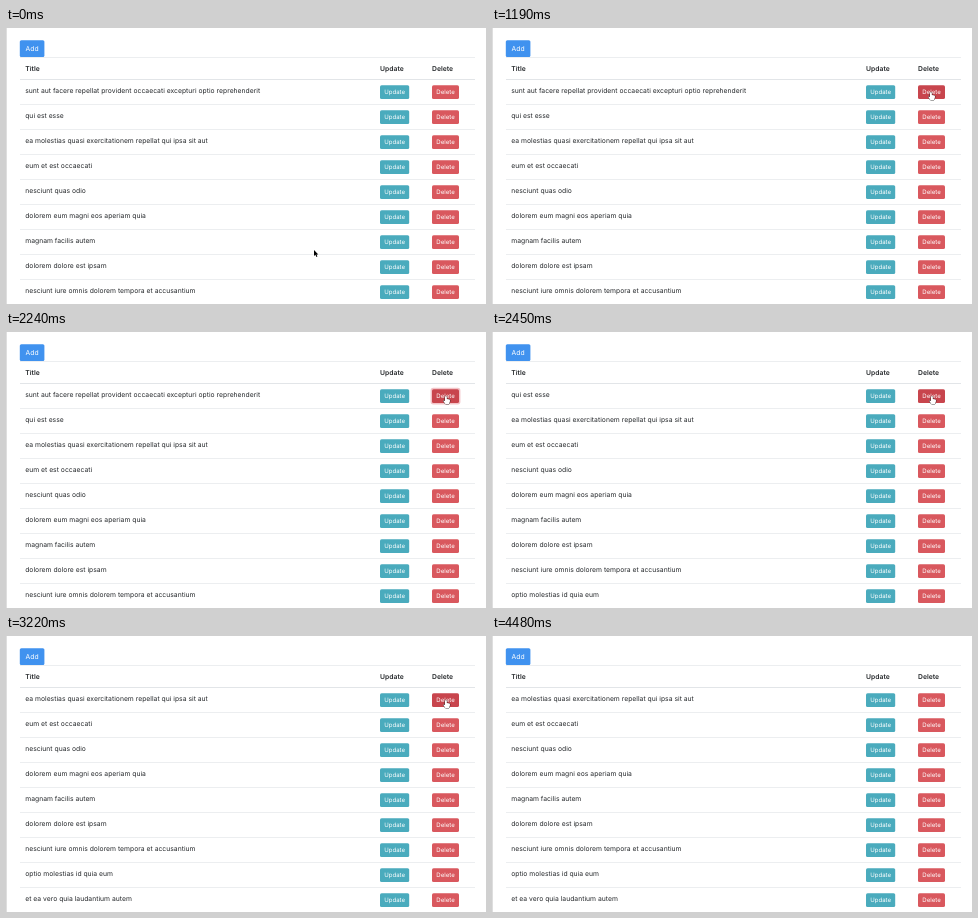
An HTML page with a canvas that plays this animation: 480 by 276 pixels, repeating every 4620 ms.

```html
<!DOCTYPE html>
<html lang="en">
<head>
<meta charset="utf-8">
<title>Table with delete buttons</title>
<style>
  html, body { margin: 0; width: 100%; height: 100%; overflow: hidden; background: #fff; }
  canvas { display: block; }
</style>
</head>
<body>
<canvas id="stage" width="480" height="276"></canvas>
<script>
const ctx = document.getElementById('stage').getContext('2d');
const LOOP = 4620, STEP = 70;
const ROW_TOP = 52, ROW_HEIGHT = 25;
const INK = '#25282b', BLUE = '#4092ef', TEAL = '#4aabbd', RED = '#d9585e', DARK_RED = '#c8454d';
const FONT = 'Inter, "Open Sans", sans-serif';

const titles = [
  'sunt aut facere repellat provident occaecati excepturi optio reprehenderit',
  'qui est esse',
  'ea molestias quasi exercitationem repellat qui ipsa sit aut',
  'eum et est occaecati',
  'nesciunt quas odio',
  'dolorem eum magni eos aperiam quia',
  'magnam facilis autem',
  'dolorem dolore est ipsam',
  'nesciunt iure omnis dolorem tempora et accusantium',
  'optio molestias id quia eum',
  'et ea vero quia laudantium autem'
];

const clicks = [{ press: 2100, remove: 2310 }, { press: 2870, remove: 3080 }];
const HOVER_START = 770, HOVER_END = 3500, EXIT = 4480;

// Pointer path: time, x, y
const path = [
  [0, 308, 222], [70, 310, 219], [210, 338, 184], [350, 384, 127], [490, 420, 83],
  [630, 428, 72], [700, 428.5, 70], [840, 435, 66], [980, 439, 64], [1890, 439, 64],
  [2100, 440, 64], [3430, 440, 64], [3500, 393, 84], [3640, 382, 100], [3780, 335, 166],
  [3920, 296, 225], [3990, 291, 232.5], [4130, 290, 234], [4270, 276, 250], [4480, 248, 278]
];

function pointerAt(t) {
  const i = Math.max(1, path.findIndex(p => p[0] >= t));
  const [a, b] = [path[i - 1], path[i]];
  const k = (t - a[0]) / (b[0] - a[0]);
  return [a[1] + (b[1] - a[1]) * k, a[2] + (b[2] - a[2]) * k];
}

// Large type scaled down keeps fractional glyph spacing.
function text(str, x, y, size, color = INK, weight = 400, align = 'left') {
  ctx.save();
  ctx.translate(x, y);
  ctx.scale(0.1, 0.1);
  ctx.font = `${weight} ${size * 10}px ${FONT}`;
  ctx.textRendering = 'geometricPrecision';
  ctx.textAlign = align;
  ctx.fillStyle = color;
  ctx.fillText(str, 0, 0);
  ctx.restore();
}

function box(x, y, w, h, radius, color) {
  ctx.fillStyle = color;
  ctx.beginPath();
  ctx.roundRect(x, y, w, h, radius);
  ctx.fill();
}

function button(label, x, y, w, h, size, color) {
  box(x, y, w, h, 1.6, color);
  text(label, x + w / 2, y + h / 2 + size * 0.38, size, '#fff', 400, 'center');
}

function line(y, h, color) {
  ctx.fillStyle = color;
  ctx.fillRect(14, y, 455, h);
}

function drawTable(t) {
  const removed = clicks.filter(c => t >= c.remove).length;
  const focused = clicks.some(c => t >= c.press && t < c.remove);
  const hovered = t >= HOVER_START && t < HOVER_END;

  button('Add', 13.8, 12.2, 24.6, 17, 6.8, BLUE);
  line(29, 1, '#eceef0');
  text('Title', 19.2, 42.8, 6.8, INK, 600);
  text('Update', 374, 42.8, 6.8, INK, 600);
  text('Delete', 426, 42.8, 6.8, INK, 600);
  line(51, 1, '#e2e5e8');

  titles.slice(removed, removed + 9).forEach((title, i) => {
    const top = ROW_TOP + i * ROW_HEIGHT;
    const active = i === 0 && hovered;
    text(title, 19.2, top + 13, 6.8);
    button('Update', 374, top + 5.2, 29.2, 13.8, 6.1, TEAL);
    if (i === 0 && focused) box(424.6, top + 3.8, 29.8, 16.6, 2.6, '#f3c4c8');
    button('Delete', 426, top + 5.2, 27, 13.8, 6.1, active ? DARK_RED : RED);
    line(top + ROW_HEIGHT - 1, 1, '#eceef0');
  });
}

function drawShape(x, y, shape, fill, stroke) {
  ctx.save();
  ctx.translate(x, y);
  const outline = new Path2D(shape);
  ctx.lineWidth = 0.8;
  ctx.lineJoin = 'round';
  ctx.strokeStyle = stroke;
  ctx.stroke(outline);
  ctx.fillStyle = fill;
  ctx.fill(outline);
  ctx.restore();
}

function drawPointer(t) {
  if (t >= EXIT) return;
  const [x, y] = pointerAt(t);
  if (t >= HOVER_START && t < HOVER_END) {
    drawShape(x, y, 'M-1 .7Q0-.5 .8.7V3L3.6 3.6Q4.2 4 3.9 5.4L3 8H-.6L-2.7 5Q-2.4 4-1 5Z', '#fff', '#222');
  } else {
    drawShape(x, y, 'M0 0V6L1.4 4.8L2.4 7L3.4 6.5L2.5 4.4H4.3Z', '#000', '#fff');
  }
}

function frame(now) {
  const t = Math.floor((now % LOOP) / STEP) * STEP;
  ctx.fillStyle = '#fff';
  ctx.fillRect(0, 0, 480, 276);
  ctx.fillStyle = '#dedede';
  ctx.fillRect(0, 0, 1, 276);
  drawTable(t);
  drawPointer(t);
  requestAnimationFrame(frame);
}
requestAnimationFrame(frame);
</script>
</body>
</html>
```
